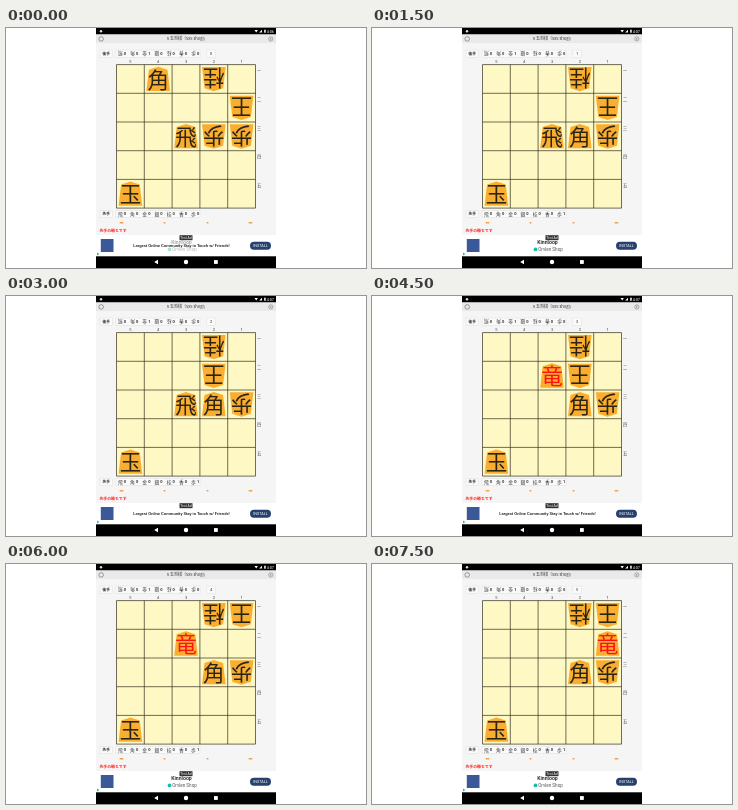
An HTML page for the animation above (9000 ms loop, 360 px wide and 240 px high).

```html
<!DOCTYPE html>
<html lang="ja">
<head>
<meta charset="utf-8">
<title>5x5 shogi</title>
<style>
html, body { margin: 0; width: 100%; height: 100%; overflow: hidden; background: #fff; }
svg { display: block; width: 360px; height: 240px; }
text { font-family: "Noto Sans CJK JP", "Noto Sans CJK", sans-serif; }
.latin { font-family: Roboto, sans-serif; }
</style>
</head>
<body>
<svg id="stage" viewBox="0 0 360 240"></svg>
<script>
const STEP_MS = 1500;
const BOARD = { x: 110.5, y: 36.6, w: 139, h: 143.5 };
const CELL_W = BOARD.w / 5, CELL_H = BOARD.h / 5;
const stage = document.getElementById('stage');

// Each entry: glyph, column and row from the top left, and whether it faces down.
const knight = ['桂', 3, 0, true], king = ['玉', 0, 4];
const pawn = ['歩', 4, 2, true], bishop = ['角', 3, 2];
const rook = ['飛', 2, 2];
const positions = [
  [['角', 1, 0], knight, ['王', 4, 1, true], rook, ['歩', 3, 2, true], pawn, king],
  [knight, ['王', 4, 1, true], rook, bishop, pawn, king],
  [knight, ['王', 3, 1, true], rook, bishop, pawn, king],
  [knight, ['竜', 2, 1], ['王', 3, 1, true], bishop, pawn, king],
  [knight, ['王', 4, 0, true], ['竜', 2, 1], bishop, pawn, king],
  [knight, ['王', 4, 0, true], ['竜', 4, 1], bishop, pawn, king]
];
const ads = ['blend', 'brand', 'slogan', 'slogan', 'brand', 'brand'];

const rect = (x, y, w, h, fill, extra = '') =>
  `<rect x="${x}" y="${y}" width="${w}" height="${h}" fill="${fill}" ${extra}/>`;
const circle = (x, y, r, fill, extra = '') =>
  `<circle cx="${x}" cy="${y}" r="${r}" fill="${fill}" ${extra}/>`;
const path = (d, fill, extra = '') => `<path d="${d}" fill="${fill}" ${extra}/>`;
const label = (value, x, y, size, fill = '#222', extra = '') =>
  `<text x="${x}" y="${y + size * .37}" font-size="${size}" fill="${fill}" text-anchor="middle" ${extra}>${value}</text>`;
const latin = (value, x, y, size, fill, extra = '') =>
  label(value, x, y, size, fill, `class="latin" ${extra}`);
const panel = (x, y, w) =>
  rect(x, y - 3.7, w, 7.4, '#fafafa', 'stroke="#e0e0e0" stroke-width=".5"');

function piece([glyph, col, row, down]) {
  const x = BOARD.x + (col + .5) * CELL_W, y = BOARD.y + (row + .5) * CELL_H;
  return `<g transform="translate(${x} ${y}) rotate(${down ? 180 : 0})">` +
    path('M0-12.3 9.3-9.3 11.8 12H-11.8L-9.3-9.3Z', '#faae30') +
    label(glyph, 0, .7, 21.5, glyph === '竜' ? '#f11' : '#2a2414', 'font-weight="500"') + '</g>';
}

function board() {
  let lines = '', labels = '';
  for (let i = 0; i <= 5; i++) {
    lines += `M${BOARD.x + i * CELL_W} ${BOARD.y}v${BOARD.h}M${BOARD.x} ${BOARD.y + i * CELL_H}h${BOARD.w}`;
  }
  for (let i = 0; i < 5; i++) {
    labels += latin(5 - i, BOARD.x + (i + .5) * CELL_W, 34, 4, '#444');
    labels += label('一二三四五'[i], 253, BOARD.y + i * CELL_H + 6.2, 4.2, '#444');
  }
  return rect(BOARD.x, BOARD.y, BOARD.w, BOARD.h, '#fdf8c4') +
    path(lines, 'none', 'stroke="#33301f" stroke-width=".7"') + labels;
}

function hand(name, y, counts, turned) {
  const items = [...'飛角金銀桂香歩'].map((glyph, i) => {
    const x = 114.3 + i * 12.2;
    const turn = turned ? `transform="rotate(180 ${x} ${y})"` : '';
    return label(glyph, x, y, 4.8, '#444', `font-weight="500" ${turn}`) +
      latin(counts[i], x + 4.6, y, 4, '#333', 'font-weight="700"');
  }).join('');
  return panel(94, y, 12.5) + panel(110, y, 84) +
    label(name, 100.3, y, 3.7, '#222', 'font-weight="700"') + items;
}

function appBars(step) {
  return rect(90, 0, 180, 6.5, '#000') + circle(95, 3.2, 1.2, '#ddd') +
    path('M248.5 2h3.4l-1.7 2.6ZM256 1.8v2.8h-2.8Z', '#fff') +
    rect(258.2, 1.7, 1.5, 3, '#fff') +
    latin(step ? '4:07' : '4:06', 264.3, 3.2, 3.8, '#fff') +
    rect(90, 6.5, 180, 8.5, '#e9e9e9') +
    circle(95.2, 10.9, 2.3, 'none', 'stroke="#666" stroke-width=".6"') +
    label('５五将棋（5x5 shogi)', 179.5, 10.8, 4, '#333') +
    circle(264.8, 10.9, 2.1, 'none', 'stroke="#666" stroke-width=".5"') +
    circle(264.8, 10.9, .6, '#666');
}

function adContent(kind) {
  const brand = latin('Kinnloop', 175.5, 214.3, 5.2, '#111', 'font-weight="500"') +
    circle(163.5, 221.4, 1.9, '#23b8a5') +
    latin('Orvlen Shop', 178.5, 221.4, 4.6, '#555');
  const slogan = latin('Largest Online Community Stay in Touch w/ Friends!', 175.5, 217.5, 4.15, '#111', 'font-weight="500"');
  if (kind === 'blend') return `<g opacity=".4">${brand}</g>${slogan}`;
  return kind === 'brand' ? brand : slogan;
}

function ad(kind) {
  return rect(90, 207, 180, 21.5, '#fff') +
    rect(94.8, 211, 12.7, 13, '#3b5998') +
    path('M91 224.5v3l2.5-1.5Z', '#35b9b2') +
    adContent(kind) +
    rect(173.5, 207.2, 13, 5, '#333') + latin('Test Ad', 180, 209.7, 3.4, '#fff') +
    rect(244, 213.7, 21, 8, '#26406f', 'rx="4"') +
    latin('INSTALL', 254.5, 217.7, 3.7, '#fff');
}

function navigation() {
  return rect(90, 228.3, 180, 11.7, '#000') +
    path('M152 231.7v4.6L148.2 234Z', '#fff') + circle(180, 234, 2.2, '#fff') +
    rect(208, 232.1, 3.8, 3.8, '#fff');
}

function scene(step) {
  const marks = [115.5, 158.5, 201.5, 244.5].map((x, i) =>
    rect(x - (i % 3 ? .9 : 1.8), 194, i % 3 ? 1.8 : 3.6, 1.5, '#f8a040')).join('');
  return rect(0, 0, 360, 240, '#fff') + rect(90, 0, 180, 207, '#f5f5f5') +
    appBars(step) +
    hand('後手', 25.7, [0, 0, 1, 0, 0, 0, 0], true) +
    panel(200.8, 25.7, 8.5) + latin(step, 205, 25.7, 4, '#333') +
    board() + positions[step].map(piece).join('') +
    hand('先手', 186, [0, 0, 0, 0, 0, 0, step ? 1 : 0]) + marks +
    label('先手の勝ちです', 107, 202.7, 3.9, '#f22', 'font-weight="700"') +
    ad(ads[step]) + navigation();
}

const scenes = positions.map((_, step) => scene(step));
let shown = -1;
function draw(time) {
  const step = Math.floor(time / STEP_MS) % scenes.length;
  if (step !== shown) stage.innerHTML = scenes[shown = step];
}
function tick() {
  draw(performance.now());
  requestAnimationFrame(tick);
}
tick();
</script>
</body>
</html>
```
